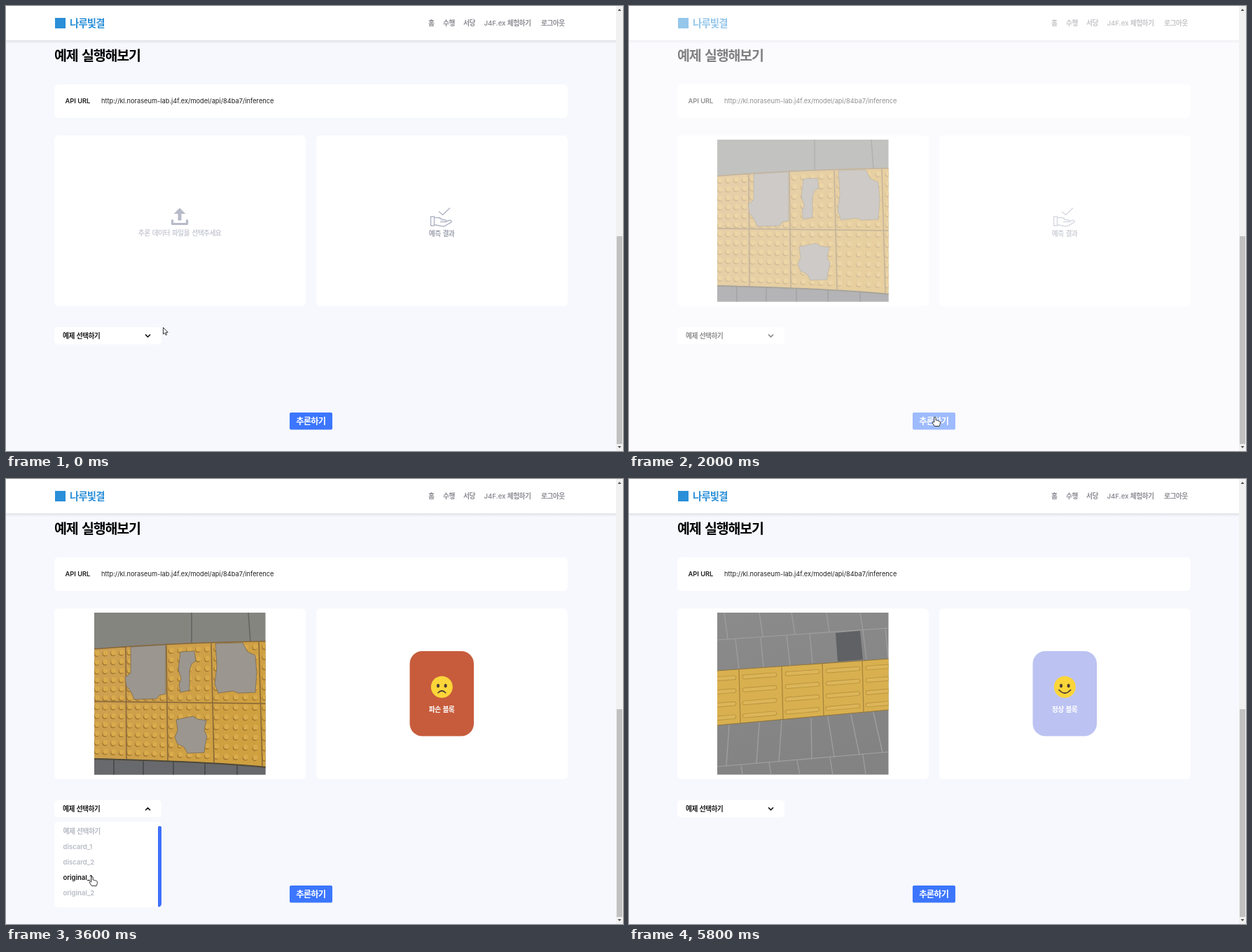
Write an HTML page that moves like this. It is 881x636 px and loops after 6390 ms.

```html
<!DOCTYPE html>
<html lang="ko">
<head>
<meta charset="utf-8">
<style>
  html, body { margin: 0; width: 100%; height: 100%; overflow: hidden; background: #f7f8fe; }
  svg { display: block; width: 881px; height: 636px; }
  text { font: 600 9.5px Inter, 'Noto Sans CJK KR', 'Noto Sans CJK', sans-serif; fill: #202020; }
  .ko { font-size: 9.76px; letter-spacing: -.06em; word-spacing: .1em; }
  .mid { text-anchor: middle; }
  .nav text { fill: #8d8e95; }
  .card { fill: #fff; }
  .white { fill: #fff; }
  .line { fill: none; stroke-linecap: round; stroke-linejoin: round; }
</style>
</head>
<body>
<svg viewBox="0 0 881 636">
  <defs>
    <linearGradient id="shade" x2="0" y2="1">
      <stop stop-color="#000" stop-opacity=".09"/><stop offset="1" stop-color="#000" stop-opacity="0"/>
    </linearGradient>
    <linearGradient id="stone" x2=".3" y2="1">
      <stop stop-color="#8b8b8c"/><stop offset="1" stop-color="#838384"/>
    </linearGradient>
    <linearGradient id="amber" x2="1" y2=".4">
      <stop stop-color="#cda054"/><stop offset="1" stop-color="#cfa03f"/>
    </linearGradient>
    <clipPath id="photoClip"><rect x="126" y="191" width="244.500" height="231.500"/></clipPath>
    <clipPath id="listClip"><rect x="69" y="490" width="153" height="122" rx="5"/></clipPath>
  </defs>

  <rect width="881" height="636" fill="#f7f8fe"/>
  <rect width="871" height="49" fill="#fff"/>
  <rect y="49" width="871" height="5" fill="url(#shade)"/>
  <rect x="70" y="17" width="15" height="15" fill="#2a8fd8"/>
  <text class="ko" x="91" y="30" style="font-size:14.400px;font-weight:700;fill:#2a8fd8">나루빛결</text>
  <g class="nav">
    <text class="ko" x="603" y="27.500">홈</text>
    <text class="ko" x="624" y="27.500">수행</text>
    <text class="ko" x="653" y="27.500">서당</text>
    <text x="682.500" y="27.500">J4F.ex <tspan class="ko">체험하기</tspan></text>
    <text class="ko" x="764" y="27.500">로그아웃</text>
  </g>

  <rect x="871" width="10" height="636" fill="#f1f1f1"/>
  <rect x="872" y="329" width="8" height="297" fill="#c1c1c1"/>
  <path d="M873.500 7l2.500-3 2.500 3zM873.500 629l2.500 3 2.500-3z" fill="#505050"/>

  <text class="ko" x="69" y="78" style="font-size:19.500px;font-weight:700;fill:#000">예제 실행해보기</text>
  <rect class="card" x="69" y="112" width="733" height="48" rx="6"/>
  <text x="84.500" y="139" style="font-size:9.300px">API URL</text>
  <text x="136" y="139" style="font-size:9.250px;font-weight:400">http://kl.noraseum-lab.j4f.ex/model/api/84ba7/inference</text>
  <rect class="card" x="69" y="185" width="359" height="244" rx="6"/>
  <rect class="card" x="443" y="185" width="359" height="244" rx="6"/>

  <g id="uploadHint" fill="#b7bac8">
    <path d="M248 288.500l8.300 8.500h-5.800v9.500h-5v-9.500h-5.800z"/>
    <path class="line" d="M237.500 306.500v5h21v-5" stroke="#b7bac8" stroke-width="3.200"/>
    <text class="ko mid" x="248" y="328" style="fill:#b0b3c2;font-weight:400">추론 데이터 파일을 선택주세요</text>
  </g>

  <g id="resultHint">
    <g class="line" stroke="#b3b6c6" stroke-width="1.500">
      <path d="M618.500 294l5 4.500 10-9.500"/>
      <path d="M606.500 301h5v13h-5zM611.500 302.500h5.500q3.500 0 5.500 3h3.500q3 .3 2.500 3h-8M628 308l5.500-1.800q3 .2 2.500 2.600l-9 5.400q-3 1.200-6 .2l-9.500-2"/>
    </g>
    <text class="ko mid" x="622" y="329" style="fill:#a0a4b0">예측 결과</text>
  </g>

  <g clip-path="url(#photoClip)">
    <g id="damagedPhoto"></g>
    <g id="intactPhoto"></g>
  </g>

  <g id="result">
    <rect id="resultCard" x="576.500" y="246" width="91.500" height="121.500" rx="18"/>
    <circle cx="622.300" cy="297.300" r="15.500" fill="#fcd53a"/>
    <ellipse cx="617" cy="295.500" rx="2" ry="2.800" fill="#4b3a35"/>
    <ellipse cx="627.600" cy="295.500" rx="2" ry="2.800" fill="#4b3a35"/>
    <path id="mouth" class="line" stroke="#4b3a35" stroke-width="1.800"/>
    <text id="resultText" class="ko mid white" x="622" y="332.500"></text>
  </g>

  <rect class="card" x="69" y="459" width="153" height="24.500" rx="5"/>
  <text class="ko" x="81" y="474.500">예제 선택하기</text>
  <path id="chevron" class="line" stroke="#111" stroke-width="1.700"/>

  <rect x="405" y="581" width="61" height="24.500" rx="2" fill="#3c76fe"/>
  <text class="ko mid white" x="435.300" y="598" style="font-size:12.200px">추론하기</text>

  <g id="list" clip-path="url(#listClip)">
    <rect class="card" x="69" y="490" width="153" height="122"/>
    <g id="items"></g>
    <rect id="thumb" x="217" width="5" height="116" rx="2" fill="#3f70fa"/>
  </g>

  <rect id="veil" width="871" height="636" fill="#fff"/>
  <g id="pointer" stroke="#222" stroke-width=".9" fill="#fff" stroke-linejoin="round">
    <path id="arrow" d="M.5.500v9.500l2.200-2 1.500 3.400 1.500-.7-1.500-3.300h3z"/>
    <path id="hand" d="M-1.200 8V1.200Q0-.4 1.200 1.200V5l1.700.2.4.4 1.700.2.400.5q1.700-.3 1.900 1.200v2.700l-1.200 3.300H-.7l-3-4.600q-.6-1.600.8-1.600z"/>
  </g>
</svg>

<script>
const LOOP = 6390, FRAME = 1000 / 15;
const $ = id => document.getElementById(id);
const show = (id, on) => $(id).setAttribute('visibility', on ? 'inherit' : 'hidden');
const set = (id, name, value) => $(id).setAttribute(name, value);
const within = (t, from, to) => t >= from && t < to;
const clamp = u => Math.max(0, Math.min(1, u));
const path = (d, fill) => `<path d="${d}" fill="${fill}"/>`;
const stroke = (d, color, width) => `<path class="line" d="${d}" stroke="${color}" stroke-width="${width}"/>`;

// Five columns of studs on each tile, in twelve rows that follow the curved band.
function studs(left, right) {
  let out = '';
  for (let i = 0; i < 5; i++) {
    const x = left + (i + .5) * (right - left) / 5, dx = x - 126;
    const top = 243 - dx * .045, bottom = 395 + dx * .045;
    for (let j = 0; j < 12; j++) {
      const y = top + (j + .5) * (bottom - top) / 12;
      out += `<circle cx="${x - .8}" cy="${y + 1.2}" r="3.800" fill="#a1762f"/>`
        + `<circle cx="${x}" cy="${y}" r="3.600" fill="#d9ab4c"/>`;
    }
  }
  return out;
}

function damagedPaving() {
  const tiles = [113, 171, 230, 294, 363, 433];
  let out = path('M126 191h245v232h-245z', '#858580')
    + stroke('M265 191v45M346 191l3 42', '#62625f', 1.5)
    + path('M126 396l245 14v14H126z', '#68696c')
    + stroke('M154 400v23M196 402v21M239 404v19M284 406v17M330 408v15', '#47484b', 1.6)
    + path('M126 243Q240 234 371 232V412Q290 404 126 399z', 'url(#amber)');
  tiles.slice(1).forEach((right, i) => { out += studs(tiles[i], right); });
  out += stroke('M126 318l245 3M171 240l1 160M229 236l2 167M293 234l4 171M361 233l5 178M126 243Q240 234 371 232', '#866638', 1.5);
  const holes = [
    'M178 240l50-3v70l-9 2-4 5-32 1-4-10-7-9-2-12 8-7z',
    'M249 247l20-1 2 14-6 4-3 10v28l-13 3-2-11 3-9-4-13z',
    'M299 235l39-1 7 13 11 5 2 25-2 28-24 1-8-3-21 3-5-13 3-25z',
    'M243 344l24-5 6 4 13 2-3 14 4 9-3 14-1 9-24 1-5-9-9-4-4-10 4-10z'
  ];
  for (const d of holes) out += `<path d="${d}" fill="#9b968f" stroke="#7d6a4c" stroke-width=".8"/>`;
  return out + stroke('M126 400Q290 404 371 412', '#4f4939', 2);
}

function intactPaving() {
  const joint = '#a0a0a0';
  const edge = (x, v) => 274 - (x - 126) * .07 + v * (78 - (x - 126) * .02);
  let out = path('M126 191h245v232H126z', 'url(#stone)')
    + stroke('M126 230l245-17M136 191l5 38M186 191l5 34M232 191l5 31M282 191l4 28M330 191l4 25', joint, 1.2)
    + stroke('M152 229l5 43M188 227l4 42M225 224l5 42M258 221l4 42M334 216l5 42M366 213l4 43', joint, 1.2)
    + path('M295 220l35-3 4 41-36 3z', '#606164')
    + stroke('M143 352l-4 58M186 348l-4 58M218 345l-4 59M260 342l1 58M284 340l9 57M317 337l12 57M349 334l13 57', joint, 1.3)
    + stroke('M126 411l245-21M160 409l2 14M200 405l3 18M240 402l4 21M287 398l4 25M334 394l4 29', joint, 1.2)
    + path('M126 274L371 257V330L126 352z', '#d9b04f');
  for (const x of [99, 157, 218, 276, 333]) {
    for (const v of [.15, .39, .63, .87]) {
      const d = `M${x + 8} ${edge(x + 8, v)}L${x + 51} ${edge(x + 51, v)}`;
      out += stroke(d, '#b9933f', 6.6) + stroke(d, '#dcb558', 4.8);
    }
    out += stroke(`M${x} ${edge(x, 0)}l2 ${edge(x, 1) - edge(x, 0)}`, '#a8843c', 1.3);
  }
  return out + stroke('M126 274L371 257M126 352L371 330', '#8e7540', 1.2);
}

$('damagedPhoto').innerHTML = damagedPaving();
$('intactPhoto').innerHTML = intactPaving();

const labels = ['예제 선택하기', 'discard_1', 'discard_2', 'original_1', 'original_2'];
$('items').innerHTML = labels.map((label, i) =>
  `<text x="81.500" y="${512.5 + 22 * i}"${i ? '' : ' class="ko"'}>${label}</text>`).join('');
const items = [...$('items').children];

// time, x, y of the pointer
const route = [
  [0, 224, 459], [400, 201, 467], [470, 201, 467], [800, 110, 530], [930, 110, 530],
  [1330, 382, 578], [1530, 437, 587], [2400, 437, 587], [2930, 202, 468], [3070, 202, 468],
  [3530, 123, 568], [3730, 123, 568], [4270, 431, 588], [4930, 431, 588],
  [5270, 495, 547], [5530, 495, 547], [5730, 160, 623], [5800, 90, 650], [LOOP, 90, 650]
];

function pointerAt(t) {
  const i = Math.max(1, route.findIndex(p => p[0] > t));
  const [t0, x0, y0] = route[i - 1], [t1, x1, y1] = route[i];
  const u = clamp((t - t0) / (t1 - t0)), e = u * u * (3 - 2 * u);
  return [x0 + (x1 - x0) * e, y0 + (y1 - y0) * e];
}

// Rises and falls within 130 ms at each end.
const pulse = (t, from, to) => clamp(Math.min((t - from + 67) / 130, (to - t) / 130));

function render(t) {
  const [x, y] = pointerAt(t);
  const open = within(t, 460, 930) || within(t, 2990, 3725);
  const scroll = t > 3000 ? 6 * clamp((t - 3130) / 200) : 0;
  const happy = t >= 4600, judged = t >= 2195;

  show('uploadHint', t < 930);
  show('damagedPhoto', within(t, 930, 3725));
  show('intactPhoto', t >= 3725);
  show('resultHint', !judged);
  show('result', judged);
  set('resultCard', 'fill', happy ? '#bcc3f2' : '#c75c3c');
  set('mouth', 'd', happy ? 'M614 301.500q8.300 9 16.600 0' : 'M617 305.500q5.300-5.500 10.600 0');
  $('resultText').textContent = happy ? '정상 블록' : '파손 블록';

  set('chevron', 'd', open ? 'M199.500 473l3-3 3 3' : 'M199.500 470l3 3 3-3');
  show('list', open);
  set('items', 'transform', `translate(0 ${-scroll})`);
  set('thumb', 'y', 490 + scroll);
  items.forEach((item, i) => {
    const hovered = x < 217 && Math.abs(y - (509 + 22 * i - scroll)) < 11;
    item.style.fill = hovered ? '#141414' : '#b7bac5';
  });

  set('veil', 'opacity', .5 * Math.max(pulse(t, 1865, 2265), pulse(t, 4395, 4725)));

  const overSelect = within(x, 69, 222) && within(y, 459, 484);
  const overList = open && within(x, 69, 217) && within(y, 490, 612);
  const overButton = within(x, 405, 466) && within(y, 581, 606) && !within(t, 4200, 4325);
  const hand = overSelect || overList || overButton;
  show('arrow', !hand);
  show('hand', hand);
  set('pointer', 'transform', `translate(${x.toFixed(1)} ${y.toFixed(1)})`);
}

const start = performance.now();
function tick() {
  const t = (performance.now() - start) % LOOP;
  render(Math.floor((t + 4) / FRAME) * FRAME + 4);
  requestAnimationFrame(tick);
}
tick();
</script>
</body>
</html>
```
